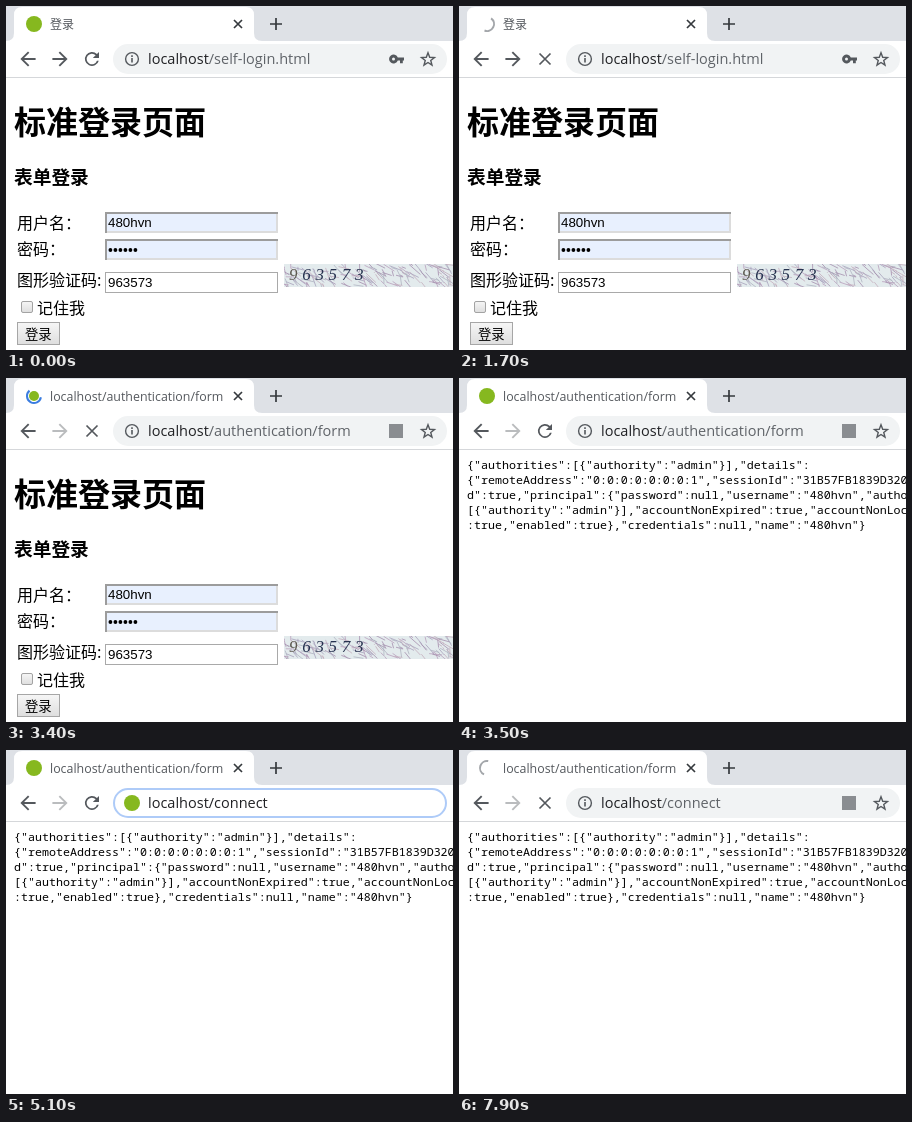
Recreate the animation shown at these times as an HTML page. Size 447 by 344 pixels, loop 8000 ms.

```html
<!DOCTYPE html>
<html lang="zh-CN">
<head>
<meta charset="utf-8">
<title>登录</title>
<style>
  html, body { margin: 0; width: 100%; height: 100%; overflow: hidden; background: #fff; }
  svg { display: block; width: 447px; height: 344px; }
  text { white-space: pre; }
  .cjk { font-family: "Noto Sans CJK SC", "Noto Sans CJK", sans-serif; }
  .ui { font-family: "Open Sans", "Noto Sans", "Noto Sans CJK SC", sans-serif; }
  .field { font: 13.33px "Liberation Sans", Arial, sans-serif; }
  .json { font: 11.667px "Noto Sans Mono", "Liberation Mono", monospace; }
  .line { fill: none; stroke: #54585d; stroke-width: 1.7; }
  .dark { stroke: #35393d; }
</style>
</head>
<body>
<svg viewBox="0 0 447 344">
  <defs>
    <linearGradient id="face" x2="0" y2="1">
      <stop stop-color="#f6f6f6"/><stop offset="1" stop-color="#dedede"/>
    </linearGradient>
    <clipPath id="captchaClip"><path d="M278 258H447V281H278z"/></clipPath>
    <path id="arrow" d="M20 11H7.83l5.59-5.59L12 4l-8 8 8 8 1.41-1.41L7.83 13H20z"/>
  </defs>
  <rect width="447" height="344" fill="#fff"/>

  <g id="login" class="cjk">
    <text x="8" y="128" font-size="32" font-weight="700">标准登录页面</text>
    <text x="8" y="177.500" font-size="18.72" font-weight="700">表单登录</text>
    <g font-size="16">
      <text x="11" y="223">用户名：</text>
      <text x="11" y="249">密码：</text>
      <text x="11" y="280">图形验证码:</text>
      <text x="31" y="308">记住我</text>
    </g>
    <g id="inputs"></g>
    <text id="user" class="field" x="102" y="221"></text>
    <g id="dots"></g>
    <text class="field" x="102" y="281">963573</text>
    <g id="captcha" clip-path="url(#captchaClip)">
      <rect x="278" y="258" width="169" height="23" fill="#e3ebed"/>
    </g>
    <rect x="15.500" y="295.500" width="11" height="11" rx="1.500" fill="url(#face)" stroke="#a3a3a3"/>
    <rect id="button" x="11.500" y="316.500" width="42" height="22" fill="url(#face)" stroke="#a6a6a6"/>
    <text x="19" y="333" font-size="13.33">登录</text>
  </g>
  <g id="json" class="json"></g>

  <rect width="447" height="35" fill="#dee1e6"/>
  <path d="M0 35Q8 35 8 27V9Q8 1 16 1H240Q248 1 248 9V27Q248 35 256 35z" fill="#fff"/>
  <rect y="35" width="447" height="36" fill="#fff"/>
  <rect y="71" width="447" height="1" fill="#d5d7da"/>
  <text id="tabTitle" class="ui" x="44" y="22.500" fill="#54585d"></text>
  <rect id="blank" x="20" y="10" width="16" height="16" fill="#f8f9fa"/>
  <circle id="tabIcon" cx="28" cy="18" fill="#86b81f"/>
  <path id="spinner" fill="none" stroke-width="2"/>
  <path class="line dark" d="M228 14l8 8m0-8l-8 8"/>
  <path class="line dark" d="M264 18h12m-6-6v12"/>

  <use href="#arrow" transform="translate(10.600 41.600) scale(.95)" fill="#54585d"/>
  <use id="forward" href="#arrow" transform="translate(65.400 41.600) scale(-.95 .95)"/>
  <path id="reload" transform="translate(75.400 42.400) scale(.88)" fill="#54585d"
    d="M17.650 6.350A8 8 0 1 0 19.730 14H17.650A6 6 0 1 1 16.220 7.780L13 11h7V4z"/>
  <path id="stop" class="line" d="M80.500 47.500l11 11m0-11l-11 11"/>

  <rect id="omnibox" x="108" y="39" width="332" height="28" rx="14" stroke-width="2"/>
  <g id="info">
    <circle class="line" cx="126" cy="53" r="6.400" style="stroke-width:1.400"/>
    <path d="M125.200 52h1.600v4.500h-1.600zM125.200 49.300h1.600v1.600h-1.600z" fill="#54585d"/>
  </g>
  <circle id="urlIcon" cx="126" cy="53" r="8" fill="#86b81f"/>
  <rect id="selection" x="142" y="43" width="164" height="20" fill="#a8cbfb"/>
  <text class="ui" x="142" y="58" font-size="14.5"><tspan fill="#202124">localhost</tspan><tspan id="path"></tspan></text>
  <path id="key" fill="#54585d" fill-rule="evenodd"
    d="M391.800 51.500A4.500 4.500 0 1 0 391.800 54.500H394V57.200H396.800V54.500H398V51.500zM387.500 51.500a1.500 1.500 0 1 1 0 3 1.500 1.500 0 0 1 0-3z"/>
  <rect id="translate" x="383" y="46" width="14" height="14" fill="#8a8d91"/>
  <path id="star" class="line" style="stroke-width:1.400"/>
</svg>
<script>
const NS = 'http://www.w3.org/2000/svg';
const USER = '480hvn';
const LOOP = 8000, STEP = 100;
const FOCUS = 600, PRESS = 1500, SUBMIT = 1700, COMMIT = 3300, LOADED = 3500;
const EDIT = 4300, REFOCUS = 5000, VISIT = 6200;
const ICON = '#54585d';

const $ = id => document.getElementById(id);
const set = (el, attrs) => {
  for (const k in attrs) el.setAttribute(k, attrs[k]);
  return el;
};
const add = (parent, tag, attrs, text = '') => {
  const el = set(document.createElementNS(NS, tag), attrs);
  el.textContent = text;
  return parent.appendChild(el);
};
const show = (id, on) => $(id).setAttribute('visibility', on ? 'visible' : 'hidden');
const polar = (cx, cy, r, deg) => {
  const a = (deg - 90) * Math.PI / 180;
  return `${(cx + r * Math.cos(a)).toFixed(2)} ${(cy + r * Math.sin(a)).toFixed(2)}`;
};

function randomizer(seed) {
  return () => (seed = seed * 16807 % 2147483647) / 2147483647;
}

function buildInput(y, filled) {
  const g = $('inputs');
  if (!filled) {
    add(g, 'rect', { x: 99.5, y: y + .5, width: 172, height: 20, fill: '#fff', stroke: '#a9a9a9' });
    return;
  }
  add(g, 'rect', { x: 99, y, width: 173, height: 21, fill: '#e8f0fe' });
  add(g, 'path', { d: `M100 ${y + 21}V${y + 1}H272`, fill: 'none', stroke: '#9c9c9c', 'stroke-width': 2 });
  add(g, 'path', { d: `M101 ${y + 20}H271V${y + 2}`, fill: 'none', stroke: '#dcdcdc', 'stroke-width': 2 });
}

function buildCaptcha() {
  const g = $('captcha'), rnd = randomizer(77);
  const inks = ['#b9a0bd', '#a9a3bd', '#c5aebd', '#b0b4c2', '#a58fae'];
  for (let i = 0; i < 150; i++) {
    const x = 276 + rnd() * 168, y = 255 + rnd() * 24;
    add(g, 'path', {
      d: `M${x.toFixed(1)} ${y.toFixed(1)}l${(rnd() * 13).toFixed(1)} ${(rnd() * 12).toFixed(1)}`,
      stroke: inks[i % inks.length], 'stroke-width': .8
    });
  }
  [...'963573'].forEach((digit, i) => add(g, 'text', {
    x: 283 + i * 13.2, y: 274, fill: i ? '#26324f' : '#5d5950',
    style: 'font: italic 17px "Liberation Serif", serif'
  }, digit));
}

function build() {
  buildInput(206, true);
  buildInput(233, true);
  buildInput(266, false);
  $('user').textContent = USER;
  for (let i = 0; i < 6; i++) add($('dots'), 'circle', { cx: 104.4 + i * 5, cy: 244, r: 1.9 });
  buildCaptcha();
  [
    '{"authorities":[{"authority":"admin"}],"details":',
    '{"remoteAddress":"0:0:0:0:0:0:0:1","sessionId":"31B57FB1839D320',
    `d":true,"principal":{"password":null,"username":"${USER}","autho`,
    '[{"authority":"admin"}],"accountNonExpired":true,"accountNonLoc',
    `:true,"enabled":true},"credentials":null,"name":"${USER}"}`
  ].forEach((line, i) => add($('json'), 'text', { x: 8, y: 91 + i * 15 }, line));
  const points = Array.from({ length: 10 }, (_, i) => polar(422, 53.6, i % 2 ? 2.9 : 6.8, i * 36));
  set($('star'), { d: `M${points.join('L')}z` });
}

function drawSpinner(t) {
  const waiting = (t >= SUBMIT && t < COMMIT) || t > VISIT;
  const loading = t >= COMMIT && t < LOADED;
  show('spinner', waiting || loading);
  show('blank', t === VISIT);
  show('tabIcon', !waiting && t !== VISIT);
  set($('tabIcon'), { r: loading ? 5 : 8 });
  if (!waiting && !loading) return;
  const anchor = t > VISIT ? 7900 : 2400;
  const from = waiting ? 205 - (t - anchor) * 360 / 1320 : 100 + (t - 3400) * .4;
  const sweep = waiting ? 165 : 220;
  set($('spinner'), {
    d: `M${polar(28, 18, 7, from)}A7 7 0 ${sweep > 180 ? 1 : 0} 1 ${polar(28, 18, 7, from + sweep)}`,
    stroke: loading ? '#3b7de0' : '#a3a6aa'
  });
}

function draw(ms) {
  const t = Math.floor(ms / STEP) * STEP;
  const first = t >= FOCUS && t < SUBMIT;
  const editing = t >= EDIT && t < VISIT;
  const busy = (t >= SUBMIT && t < LOADED) || t >= VISIT;
  const focused = first || (t >= REFOCUS && t < VISIT);
  const committed = t >= COMMIT;

  show('login', t < LOADED);
  show('json', t >= LOADED);
  set($('button'), { stroke: t >= PRESS && t < SUBMIT ? '#7b7b7b' : '#a6a6a6' });

  $('tabTitle').textContent = committed ? 'localhost/authentication/form' : '登录';
  set($('tabTitle'), { 'font-size': committed ? 12.4 : 12 });
  drawSpinner(t);

  set($('forward'), { fill: committed ? '#babcbe' : ICON });
  show('reload', !busy);
  show('stop', busy);

  set($('omnibox'), {
    fill: focused ? '#fff' : '#f1f3f4',
    stroke: focused ? '#aecbf8' : '#f1f3f4'
  });
  show('selection', first);
  show('info', !editing);
  show('urlIcon', editing);
  $('path').textContent = t >= EDIT ? '/connect' : committed ? '/authentication/form' : '/self-login.html';
  set($('path'), { fill: focused ? '#202124' : '#5f6368' });
  show('key', !committed);
  show('translate', committed && !editing);
  show('star', !editing);
}

build();
const start = performance.now();
function tick() {
  draw((performance.now() - start) % LOOP);
  requestAnimationFrame(tick);
}
tick();
</script>
</body>
</html>
```
